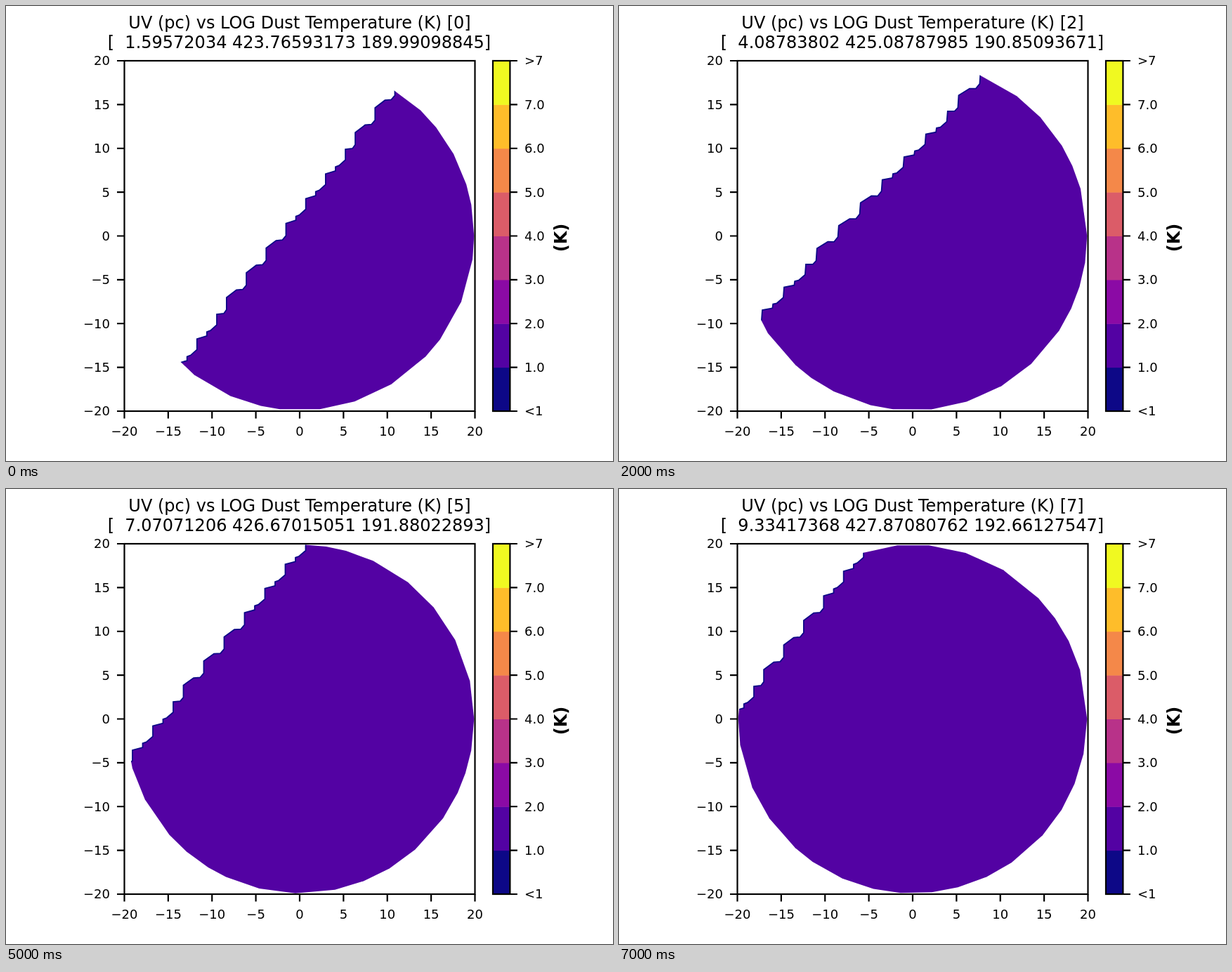
These frames come from a looping animation (864x648 px, 8 s). An HTML page:

```html
<!DOCTYPE html>
<html lang="en">
<head>
<meta charset="utf-8">
<title>Dust temperature slices</title>
<style>
  html, body { margin: 0; width: 100%; height: 100%; overflow: hidden; background: #fff; }
  svg { display: block; }
  text { font-family: "DejaVu Sans", sans-serif; font-size: 18px; fill: #000; white-space: pre; }
  .title { font-size: 24px; text-anchor: middle; }
  .axis { fill: none; stroke: #000; stroke-width: 2.2; }
</style>
</head>
<body>
<svg id="stage" width="864" height="648" viewBox="0 0 864 648">
  <clipPath id="disc"><path id="rim"/></clipPath>
  <text class="title" id="head" x="418" y="32"></text>
  <text class="title" id="coords" x="417.5" y="60"></text>
  <g clip-path="url(#disc)">
    <path id="area" fill="#5302a3"/>
    <path id="edge" fill="none" stroke="#0d0887" stroke-width="1.8"/>
  </g>
  <g id="axes"></g>
</svg>
<script>
const CX = 418, CY = 327.5, R = 248.3;
const LEFT = 168.5, TOP = 78, SIZE = 499;
const BAR = 693, BAR_W = 24.4;
const $ = id => document.getElementById(id);
const axes = $("axes");

function add(tag, attrs, text) {
  const el = document.createElementNS("http://www.w3.org/2000/svg", tag);
  for (const key in attrs) el.setAttribute(key, attrs[key]);
  if (text !== undefined) el.textContent = text;
  axes.appendChild(el);
}

function drawAxes() {
  const plasma = ["#0d0887", "#5302a3", "#8b0aa5", "#b83289", "#db5c68", "#f48849", "#febd2a", "#f0f921"];
  const band = SIZE / 8, bottom = TOP + SIZE;
  plasma.forEach((fill, i) =>
    add("rect", { x: BAR, y: bottom - (i + 1) * band, width: BAR_W, height: band + (i ? 0.5 : 0), fill }));
  let ticks = "";
  for (let i = 0; i <= 8; i++) {
    const p = i * band, y = bottom - p, x = LEFT + p, base = Math.round(y + 6.4);
    const label = String(i * 5 - 20).replace("-", "\u2212");
    const level = i === 0 ? "<1" : i === 8 ? ">7" : i + ".0";
    ticks += `M${LEFT} ${y}h-10.5M${x} ${bottom}v10.5M${BAR + BAR_W} ${y}h10.5`;
    add("text", { x: 148, y: base, "text-anchor": "end" }, label);
    add("text", { x: x, y: 612, "text-anchor": "middle" }, label);
    add("text", { x: 738, y: base }, level);
  }
  add("path", { class: "axis", d: ticks });
  add("rect", { class: "axis", x: LEFT, y: TOP, width: SIZE, height: SIZE });
  add("rect", { class: "axis", x: BAR, y: TOP, width: BAR_W, height: SIZE });
  add("text", {
    transform: "translate(798 330) rotate(-90)", "text-anchor": "middle",
    style: "font-size:24px;font-weight:bold"
  }, "(K)");
}

const path = pts => "M" + pts.map(p => p[0].toFixed(1) + " " + p[1].toFixed(1)).join("L");

// The ray crosses 1 to 3 cell faces per step, so each step is sqrt(n) units long.
const origin = [1.59572034, 423.765931732, 189.99098845];
const unit = [0.7194124078, 0.3816135497, 0.2482456804];
const crossed = [3, 3, 2, 3, 1, 3, 2];

function coordsAt(i) {
  const dist = crossed.slice(0, i).reduce((sum, n) => sum + Math.sqrt(n), 0);
  const parts = origin.map((o, k) => {
    const [whole, digits] = (o + unit[k] * dist).toFixed(8).split(".");
    return whole.padStart(3) + "." + digits.replace(/0+$/, "").padEnd(8);
  });
  return "[" + parts.join(" ") + "]";
}

// One stair, relative to its lower corner. P: smooth, R: notched, B: half width.
function stair(kind, t) {
  const ax = 28.3 + t, ay = -35.1 + 0.94 * t, mid = ax / 2;
  const bx = 14 + 0.65 * t, by = -23.8 + 0.4 * t;
  const lean = Math.max(0, t - 1) * 0.65;
  if (kind === "B") return [[10, -1 + 0.3 * t], [bx - lean, -6.5 + 0.5 * t], [bx, by]];
  if (kind === "P") return [[mid, -10.7 + 0.4 * t], [ax * 0.82 - lean, -11.5 + 0.75 * t],
                            [ax - lean, ay / 2], [ax, ay]];
  return [[mid - lean, -4.3 + 0.55 * t], [mid - lean / 4, -10 + 0.5 * t],
          [mid + 5.2, -12 + 0.8 * t], [ax - lean, -20 + 0.8 * t], [ax, ay]];
}

const CYCLE = "BPPPRRR";

// Three cycles of stairs; the second one starts at (x, y).
function jagged([x, y, tilt]) {
  for (const kind of CYCLE) {
    const [dx, dy] = stair(kind, tilt).pop();
    x -= dx;
    y -= dy;
  }
  const pts = [[x, y]];
  for (const kind of CYCLE.repeat(3)) {
    const [px, py] = pts[pts.length - 1];
    for (const [dx, dy] of stair(kind, tilt)) pts.push([px + dx, py + dy]);
  }
  return pts;
}

function random(seed) {
  return () => (seed = (seed * 16807) % 2147483647) / 2147483647;
}

// Irregular polygon inscribed in the disc
function rimPoints(seed) {
  const rnd = random(seed), pts = [];
  for (let deg = 0; deg < 354; deg += 6 + 9 * rnd()) {
    const r = deg * Math.PI / 180;
    pts.push([CX + R * Math.cos(r), CY + R * Math.sin(r)]);
  }
  return pts;
}

// Edge of each slice: a corner point and its tilt
const cuts = [
  [300, 439, -0.1], [279, 411, 0.9], [266, 368, 2.7], [238, 353, 4.8],
  [225, 362, -1.5], [238, 303, 0.7], [246, 246, 2.8], [192, 281, 0.1]
];

const slices = cuts.map((cut, i) => {
  const edge = jagged(cut);
  const corners = [[900, -50], [900, 700], [edge[0][0], 700]];
  return {
    coords: coordsAt(i),
    edge: path(edge),
    area: path(edge.concat(corners)) + "Z",
    rim: path(rimPoints(7919 * (i + 3))) + "Z"
  };
});

let shown = -1;
function show(ms) {
  const i = Math.floor(ms / 1000) % slices.length;
  if (i === shown) return;
  shown = i;
  const s = slices[i];
  $("head").textContent = `UV (pc) vs LOG Dust Temperature (K) [${i}]`;
  $("coords").textContent = s.coords;
  for (const id of ["rim", "area", "edge"]) $(id).setAttribute("d", s[id]);
}

drawAxes();
show(0);
const start = performance.now();
function tick() {
  show(performance.now() - start);
  requestAnimationFrame(tick);
}
requestAnimationFrame(tick);
</script>
</body>
</html>
```
